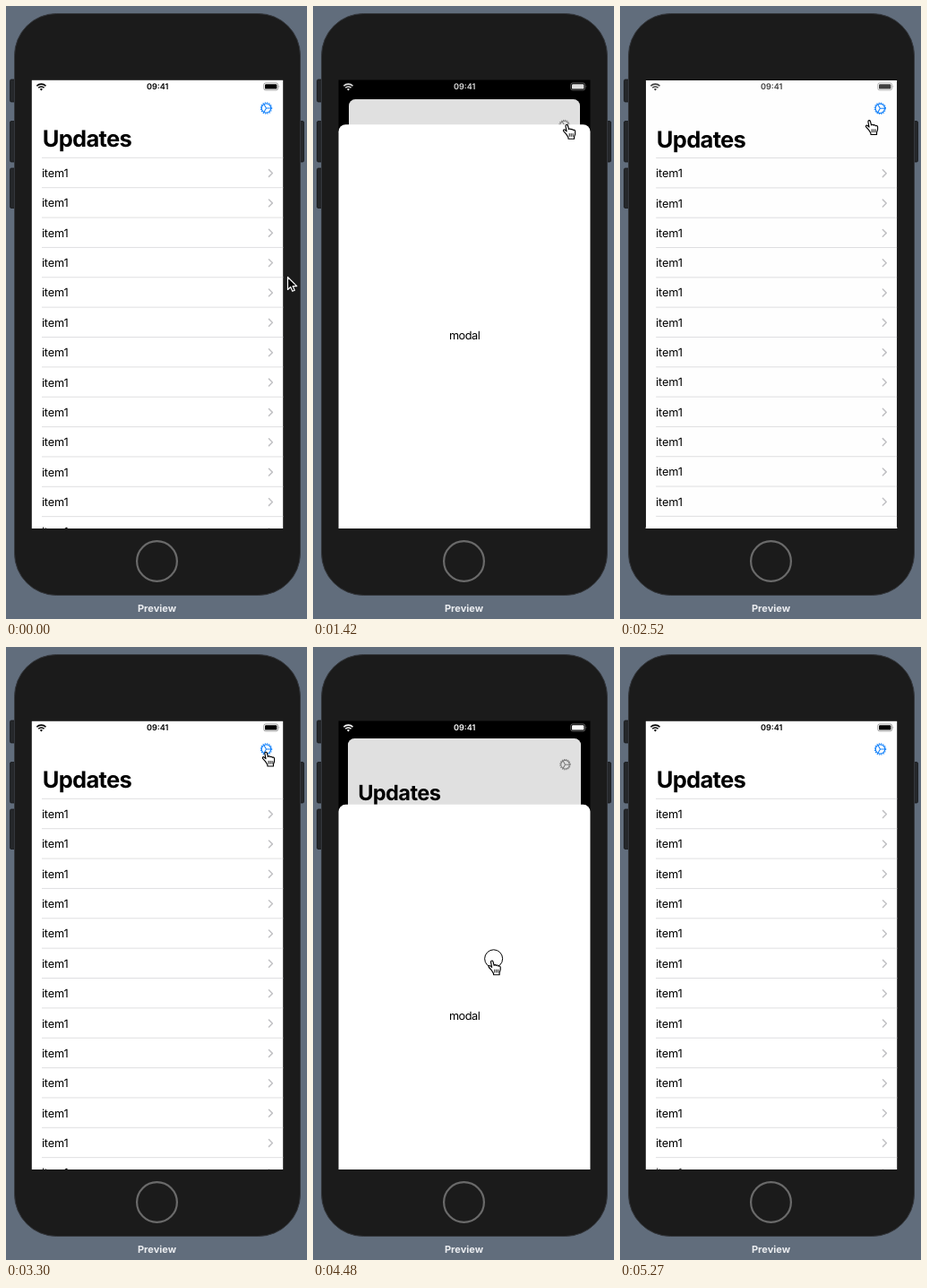
Recreate the animation shown at these times as an HTML page. Size 336x684 px, loop 5590 ms.

```html
<!DOCTYPE html>
<html lang="en">
<head>
<meta charset="utf-8">
<title>Modal preview</title>
<style>
  html, body { margin: 0; width: 100%; height: 100%; overflow: hidden; background: #616d7c; }
  svg { display: block; width: 100vw; height: 100vh; }
  text { font-family: Inter, "Liberation Sans", sans-serif; text-rendering: geometricPrecision; }
  .body { font-size: 12.7px; }
  .line { fill: none; stroke-linecap: round; stroke-linejoin: round; }
  .teeth { stroke-linecap: butt; }
</style>
</head>
<body>
<svg viewBox="0 0 336 684">
  <defs>
    <clipPath id="screen"><rect x="28" y="82" width="282" height="501"/></clipPath>
    <clipPath id="card"><rect id="cardShape" width="281" height="580"/></clipPath>
  </defs>

  <g fill="#25272a" stroke="#17191b" stroke-width=".8">
    <rect x="4.5" y="82" width="8" height="25" rx="1.5"/>
    <rect x="4.5" y="128.5" width="8" height="45.5" rx="1.5"/>
    <rect x="4.5" y="181" width="8" height="44.5" rx="1.5"/>
    <rect x="324" y="128.5" width="8.5" height="45.5" rx="1.5"/>
  </g>
  <rect x="9.5" y="8.5" width="319" height="649" rx="47" fill="#1b1b1b" stroke="#34373c"/>
  <circle cx="168.5" cy="619.5" r="22.4" fill="none" stroke="#6a6a6a" stroke-width="2.2"/>
  <text x="168.5" y="676.3" text-anchor="middle" font-size="11" font-weight="700" fill="#eceef1">Preview</text>

  <g clip-path="url(#screen)">
    <rect x="28.5" y="82.5" width="281" height="501"/>
    <g id="list">
      <g clip-path="url(#card)">
        <rect width="281" height="580" fill="#fff"/>
        <text x="12.2" y="74.8" font-size="25.5" font-weight="700" letter-spacing="-.68">Updates</text>
        <g id="rows"></g>
        <g id="gear" class="line" transform="translate(262 31.5)">
          <circle r="5.2" stroke-width="1.2"/>
          <circle class="teeth" r="6.2" stroke-width="1.1" stroke-dasharray="1.2 1.235"/>
          <path d="M0 0H5M0 0L-2.5 -4.3M0 0L-2.5 4.3" stroke-width="1.1"/>
        </g>
        <rect id="dim" width="281" height="580"/>
      </g>
    </g>
    <g id="modal">
      <path d="M28.5 520V8a8 8 0 0 1 8-8H301.5a8 8 0 0 1 8 8V520Z" fill="#fff"/>
      <text class="body" x="169.2" y="240" text-anchor="middle" letter-spacing="-.42">modal</text>
    </g>
    <g id="status">
      <text x="169.2" y="93.4" text-anchor="middle" font-size="9.1" font-weight="600">09:41</text>
      <path class="line teeth" d="M34.3 89.2a7.2 7.2 0 0 1 10.2 0M36.2 91.3a4.5 4.5 0 0 1 6.4 0" stroke="currentColor" stroke-width="1.6"/>
      <path d="M39.4 94.6l-1.6-1.8a2.3 2.3 0 0 1 3.2 0z"/>
      <rect x="287.7" y="85.9" width="16" height="8" rx="2.2" fill="none" stroke="currentColor" stroke-opacity=".45" stroke-width=".8"/>
      <rect x="289" y="87.2" width="13.4" height="5.4" rx="1.2"/>
      <path d="M304.7 88.6q1.2 1.3 0 2.6z" fill-opacity=".5"/>
    </g>
  </g>

  <g id="cursor">
    <circle id="touch" r="10" fill="none" stroke="#000"/>
    <path id="arrow" d="M.5 .5V14.5L3.7 11.5L5.8 16.3L8.2 15.3L6.1 10.6H10.7Z" fill="#000" stroke="#fff" stroke-width="1.2" stroke-linejoin="round"/>
    <g id="hand" class="line" transform="translate(-6.5 1.5)" stroke="#000">
      <path d="M4.2 11.4L1.3 8.2C.2 6.8 1.6 5.6 2.8 6.6L4.5 8.1L3.4 2.3C3.2 .4 5.4 .2 5.9 1.8L7 6C7.4 5 9 5 9.4 6.2C10 5.4 11.3 5.6 11.7 6.8C12.5 6.2 13.9 6.6 14.1 8C14.5 10.5 14.1 12 13 14.2V16.5H6.5L6.3 14.8Z" fill="#fff" stroke-width="1.15"/>
      <path d="M7.6 10.8v3M9.6 10.8v3M11.6 10.8v3" stroke-width=".9"/>
    </g>
  </g>
</svg>

<script>
const LOOP = 5590, TOP = 112.5, BOTTOM = 583;
const REST = { x: 314, y: 302 }, GEAR = { x: 292, y: 115 };
const $ = id => document.getElementById(id);
const clamp = v => Math.max(0, Math.min(1, v));
const mix = (a, b, k) => a + (b - a) * k;
const ramp = (t, a, b) => clamp((t - a) / (b - a));

// Pointer moves: start, end, destination. It rests in between.
const moves = [
  [250, 810, GEAR],
  [1390, 1760, { x: 209.5, y: 296.5 }],
  [2030, 2050, { x: 209, y: 425.5 }],
  [2215, 2520, { x: 280, y: 125.5 }],
  [2520, 2750, GEAR],
  [3830, 4120, { x: 203, y: 284.5 }],
  [4446, 4600, { x: 197, y: 563 }],
  [4790, 5220, { x: 190, y: 705 }]
];

// Each round: press the gear, show the modal, grab it, drop it.
const rounds = [
  { press: 980, show: 1160, grab: 1970, drop: 2220 },
  { press: 3540, show: 3657, grab: 4420, drop: 4795 }
];

function pointer(t) {
  let { x, y } = REST;
  for (const [a, b, to] of moves) {
    const k = ramp(t, a, b);
    x = mix(x, to.x, k);
    y = mix(y, to.y, k);
  }
  return { x, y };
}

// Remaining distance of a critically damped spring.
function spring(ms) {
  const x = Math.max(0, ms) * .019;
  return Math.exp(-x) * (1 + x);
}

function modalY(t, r) {
  if (t < r.grab) return mix(TOP, BOTTOM, spring(t - r.show));
  const held = Math.min(t, r.drop - 30);
  const dragged = TOP + pointer(held).y - pointer(r.grab).y;
  return mix(BOTTOM, dragged, spring(t - r.drop));
}

function drawScreen(t, r) {
  const y = modalY(t, r), p = ramp(y, TOP, BOTTOM);
  const left = mix(40.5, 28.5, p), scale = (338 - 2 * left) / 281;
  $('list').setAttribute('transform', `translate(${left} ${mix(105, 82.5, p)}) scale(${scale})`);
  $('cardShape').setAttribute('rx', 8 * clamp((1 - p) * 3));
  $('dim').setAttribute('opacity', .12 * clamp((1 - p) * 1.2));
  $('modal').setAttribute('transform', `translate(0 ${y})`);

  const light = 255 * ramp(t, r.show, r.show + 300) * (1 - ramp(t, r.drop, r.drop + 400));
  $('status').style.color = $('status').style.fill = `rgb(${light},${light},${light})`;

  const pressed = ramp(t, r.press, r.press + 110);
  const grey = pressed * (1 - ramp(t, r.drop, r.drop + 250));
  $('gear').style.stroke = `rgb(${mix(22, 140, grey)},${mix(131, 140, grey)},${mix(250, 140, grey)})`;
  $('gear').style.opacity = 1 - .78 * pressed * (1 - ramp(t, r.show, r.show + 240));
}

function drawCursor(t, r) {
  const { x, y } = pointer(t);
  const arrow = t < 830 || y > BOTTOM;
  $('cursor').setAttribute('transform', `translate(${x} ${y})`);
  $('arrow').style.display = arrow ? '' : 'none';
  $('hand').style.display = arrow ? 'none' : '';
  $('touch').style.display = t >= r.grab && t < r.drop ? '' : 'none';
}

function draw(t) {
  const r = rounds[t < 3000 ? 0 : 1];
  drawScreen(t, r);
  drawCursor(t, r);
}

let rows = '<path d="M11.5 86.8H281" stroke="#dfdfe1"/>';
for (let i = 0; i < 13; i++) {
  const y = 104 + i * 33.36;
  rows += `<text class="body" x="11.4" y="${y + 4.5}" letter-spacing="-.12">item1</text>
    <path class="line" d="M265 ${y - 3.9}l3.9 3.9l-3.9 3.9" stroke="#c2c2c5" stroke-width="1.5"/>
    <path d="M11.5 ${y + 16.2}H281" stroke="#dfdfe1"/>`;
}
$('rows').innerHTML = rows;

const start = performance.now();
function tick(now) {
  draw(Math.max(0, now - start) % LOOP);
  requestAnimationFrame(tick);
}
draw(0);
requestAnimationFrame(tick);
</script>
</body>
</html>
```
